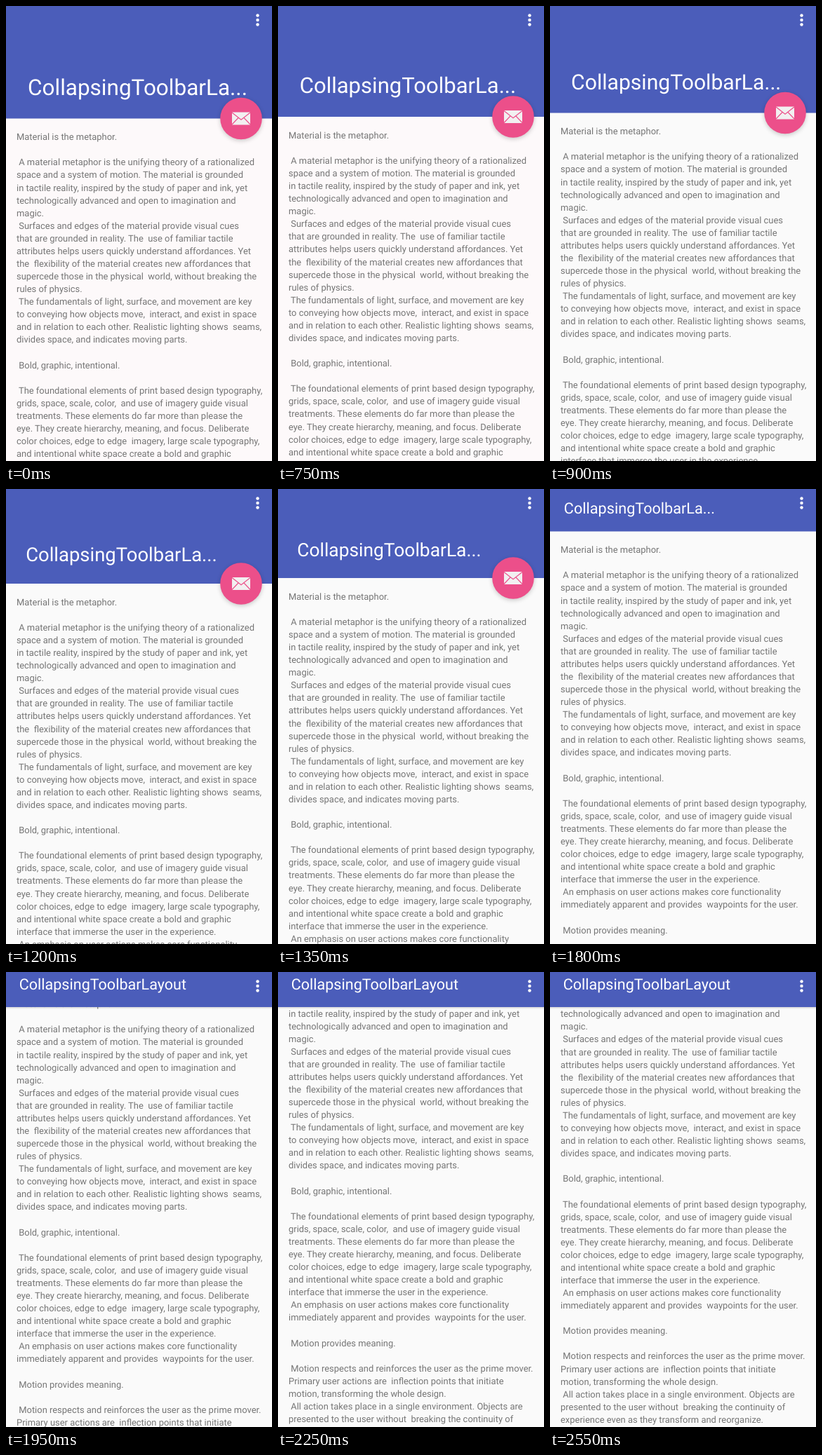
Write an HTML page with a canvas that moves like this. It is 379 by 649 pixels and loops after 2980 ms.

```html
<!DOCTYPE html>
<html lang="en">
<head>
<meta charset="utf-8">
<title>Collapsing toolbar</title>
<style>
  html, body { margin: 0; width: 100%; height: 100%; overflow: hidden; background: #fafafa; }
  canvas { display: block; width: 379px; height: 649px; }
</style>
</head>
<body>
<canvas id="stage" width="379" height="649"></canvas>
<script>
const W = 379, H = 649, LOOP = 2980;
const BLUE = '#4b5dba', PINK = '#ec4f8a';
const HEADER_MAX = 160.5, HEADER_MIN = 50, RANGE = HEADER_MAX - HEADER_MIN;

// The scroll position advances once per STEP, starting at START.
const START = 750, STEP = 150;
const SCROLL = [2.5, 8, 17, 25.5, 33.5, 55, 76.5, 100, 141, 173, 200, 211, 217.3];

const LINES = `Material is the metaphor.

 A material metaphor is the unifying theory of a rationalized
space and a system of motion. The material is grounded
in tactile reality, inspired by the study of paper and ink, yet
technologically advanced and open to imagination and
magic.
 Surfaces and edges of the material provide visual cues
that are grounded in reality. The  use of familiar tactile
attributes helps users quickly understand affordances. Yet
the  flexibility of the material creates new affordances that
supercede those in the physical  world, without breaking the
rules of physics.
 The fundamentals of light, surface, and movement are key
to conveying how objects move,  interact, and exist in space
and in relation to each other. Realistic lighting shows  seams,
divides space, and indicates moving parts.

 Bold, graphic, intentional.

 The foundational elements of print based design typography,
grids, space, scale, color,  and use of imagery guide visual
treatments. These elements do far more than please the
eye. They create hierarchy, meaning, and focus. Deliberate
color choices, edge to edge  imagery, large scale typography,
and intentional white space create a bold and graphic
interface that immerse the user in the experience.
 An emphasis on user actions makes core functionality
immediately apparent and provides  waypoints for the user.

 Motion provides meaning.

 Motion respects and reinforces the user as the prime mover.
Primary user actions are  inflection points that initiate
motion, transforming the whole design.
 All action takes place in a single environment. Objects are
presented to the user without  breaking the continuity of
experience even as they transform and reorganize.`.split('\n');

const canvas = document.getElementById('stage');
const ctx = canvas.getContext('2d');
const ratio = window.devicePixelRatio || 1;
canvas.width = W * ratio;
canvas.height = H * ratio;

const lerp = (a, b, t) => a + (b - a) * t;
const decelerate = t => 1 - (1 - t) * (1 - t);

function disc(x, y, r, color) {
  ctx.fillStyle = color;
  ctx.beginPath();
  ctx.arc(x, y, r, 0, Math.PI * 2);
  ctx.fill();
}

function label(text, x, y, size, color) {
  ctx.font = `${size}px Roboto, sans-serif`;
  ctx.fillStyle = color;
  ctx.fillText(text, x, y);
}

function drawBody(scroll) {
  LINES.forEach((line, i) => {
    const y = 191.2 + i * 18.08 - scroll;
    if (y > 30 && y < H + 15) label(line, 15, y, 12.94, '#757575');
  });
}

function drawHeader(height, t) {
  if (t === 1) {
    const shade = ctx.createLinearGradient(0, height, 0, height + 3);
    shade.addColorStop(0, 'rgba(0,0,0,.14)');
    shade.addColorStop(1, 'rgba(0,0,0,0)');
    ctx.fillStyle = shade;
    ctx.fillRect(0, height, W, 3);
  }
  ctx.fillStyle = BLUE;
  ctx.fillRect(0, 0, W, height);

  const text = t === 1 ? 'CollapsingToolbarLayout' : 'CollapsingToolbarLa...';
  label(text, lerp(31, 18.7, t), lerp(126.5, 25, t), lerp(31.5, 21.57, decelerate(t)), '#fff');
  for (const y of [13.5, 20, 26.5]) disc(358.5, y, 2.2, '#fff');
}

function drawEnvelope() {
  ctx.fillStyle = '#f2f0f1';
  ctx.fillRect(-13, -9, 26, 18);
  ctx.strokeStyle = PINK;
  ctx.lineWidth = 1.1;
  ctx.beginPath();
  ctx.moveTo(-13, -8.5);
  ctx.lineTo(0, 1.8);
  ctx.lineTo(13, -8.5);
  ctx.moveTo(-13, 8.5);
  ctx.lineTo(-4, -1);
  ctx.moveTo(13, 8.5);
  ctx.lineTo(4, -1);
  ctx.stroke();
}

function drawButton(y, scale, alpha) {
  ctx.save();
  ctx.globalAlpha = alpha;
  ctx.translate(335, y);
  ctx.scale(scale, scale);
  ctx.save();
  ctx.shadowColor = 'rgba(0,0,0,.2)';
  ctx.shadowBlur = 6 * scale * ratio;
  ctx.shadowOffsetY = 2 * scale * ratio;
  disc(0, 0, 29.8, PINK);
  ctx.restore();
  drawEnvelope();
  ctx.restore();
}

function draw(time) {
  const step = Math.floor((time - START) / STEP);
  const scroll = step < 0 ? 0 : SCROLL[Math.min(step, SCROLL.length - 1)];
  const t = Math.min(1, scroll / RANGE);
  const height = HEADER_MAX - t * RANGE;

  ctx.setTransform(ratio, 0, 0, ratio, 0, 0);
  ctx.textRendering = 'geometricPrecision';
  ctx.fillStyle = step < 1 ? '#fdf9fa' : '#fafafa';
  ctx.fillRect(0, 0, W, H);
  drawBody(scroll);
  drawHeader(height, t);

  // The button shrinks away once the header gets short.
  if (height > 100) drawButton(height, 1, 1);
  else if (height > 80) drawButton(height, 0.37, 0.5);
}

function tick() {
  draw(performance.now() % LOOP);
  requestAnimationFrame(tick);
}
tick();
</script>
</body>
</html>
```
